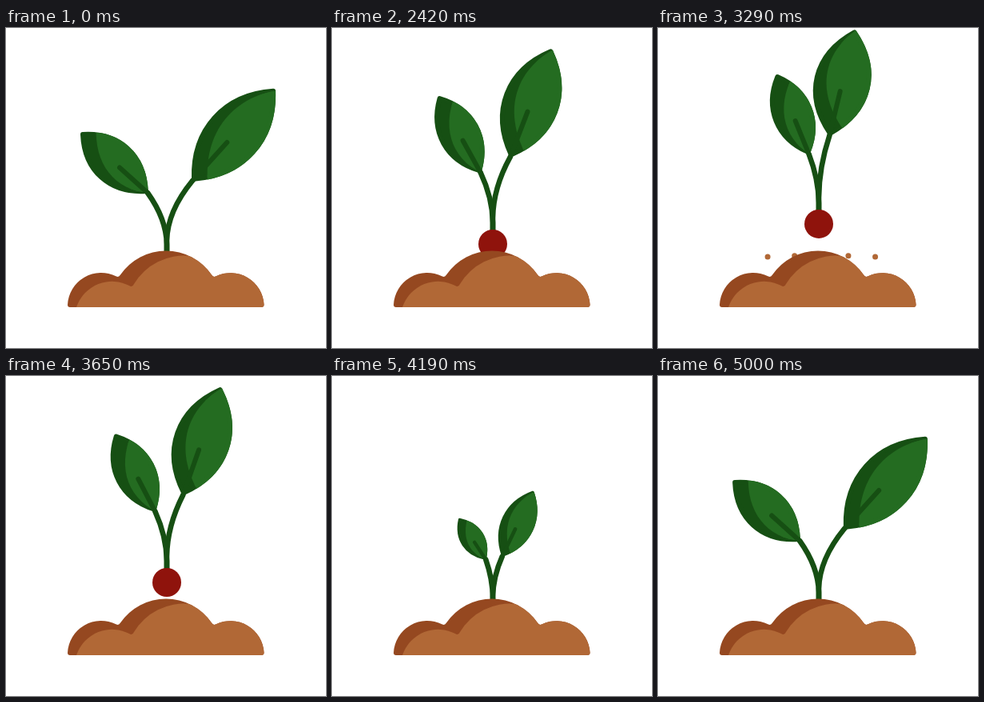
Write an HTML page with a canvas that moves like this. It is 400x400 px and loops after 5.03 s.

```html
<!DOCTYPE html>
<html lang="en">
<head>
<meta charset="utf-8">
<title>Sprout</title>
<style>
html, body { margin: 0; width: 100%; height: 100%; overflow: hidden; background: #fff; }
canvas { display: block; width: 400px; height: 400px; }
</style>
</head>
<body>
<canvas id="stage" width="400" height="400"></canvas>
<script>
const ctx = document.getElementById('stage').getContext('2d');
const LOOP = 5030;
const DARK = '#164f13', LIGHT = '#246c21', BULB = '#8f130c', SOIL = '#b16836', SHADE = '#954820';

const mound = new Path2D('M80 349Q77 349 77 346A42 42 0 0 1 138 310.5Q141 312 143 308.5A69 69 0 0 1 257 308.5Q259 312 262 310.5A42 42 0 0 1 322.5 346Q322.5 349 319 349Z');
const moundLight = new Path2D('M88 349A47 47 0 0 1 155 322.5Q158 324.5 160 320A73 73 0 0 1 230 285L330 270V349Z');

const clamp = v => Math.max(0, Math.min(1, v));
const span = (t, from, to) => clamp((t - from) / (to - from));
const easeOut = u => Math.sin(u * Math.PI / 2);
const easeInOut = u => (1 - Math.cos(u * Math.PI)) / 2;

function disc(x, y, r, color) {
  ctx.fillStyle = color;
  ctx.beginPath();
  ctx.arc(x, y, r, 0, 7);
  ctx.fill();
}

// Fill with softly rounded corners
function paint(path, color) {
  ctx.fillStyle = ctx.strokeStyle = color;
  ctx.lineWidth = 6;
  ctx.fill(path);
  ctx.stroke(path);
}

// Lens outline pointing up from (x, base), w is the handle offset
function lens(len, w, x = 0, base = 0) {
  const p = new Path2D(), y = f => base - len * f;
  p.moveTo(x, y(0));
  p.bezierCurveTo(x - w, y(.3), x - w, y(.7), x, y(1));
  p.bezierCurveTo(x + w, y(.7), x + w, y(.3), x, y(0));
  p.closePath();
  return p;
}

function branch({ x, y, angle, len, width, size, shift }) {
  ctx.strokeStyle = DARK;
  ctx.lineWidth = 6.6;
  ctx.beginPath();
  ctx.moveTo(x, y);
  ctx.bezierCurveTo(x * .45, y * .8, x * .02, y * .57, 0, y * .3);
  ctx.lineTo(0, 0);
  ctx.stroke();
  if (size < .05) return;

  ctx.save();
  ctx.translate(x, y);
  ctx.rotate(angle * Math.PI / 180);
  ctx.scale(size, size);
  const leaf = lens(len - 6, width, 0, -3);
  paint(leaf, DARK);
  ctx.save();
  ctx.clip(lens(len, width + 4, ...shift));
  paint(leaf, LIGHT);
  ctx.restore();
  ctx.strokeStyle = DARK;
  ctx.lineWidth = 6 / Math.sqrt(size);
  ctx.beginPath();
  ctx.moveTo(0, 0);
  ctx.lineTo(0, -len * .42);
  ctx.stroke();
  ctx.restore();
}

// fold: 0 open, 1 closed; young: 1 seedling, 0 fully grown
function plant({ x = 201, y = 298, turn = 0, fold = 0, young = 0 }) {
  const f2 = fold * fold, spread = 1 - 1.1 * young ** .62, late = young ** 1.1;
  ctx.save();
  ctx.translate(x, y);
  ctx.rotate(turn * Math.PI / 180);
  branch({
    x: 32 * spread - 23 * f2, y: -107 + 92 * late - 4 * f2,
    angle: 42 - 40 * young - 31.5 * fold,
    len: 154 - 22 * f2, width: 43, size: 1 - young, shift: [14, -12.7]
  });
  branch({
    x: -24 * spread + 13 * fold, y: -92 + 57 * young + 6 * f2,
    angle: -48 + 36 * young + 28.6 * fold,
    len: 112 - 5 * fold, width: 32.5 - 3 * fold, size: Math.max(0, 1 - 1.2 * late), shift: [12.7, 14]
  });
  disc(0, 0, 18, BULB);
  ctx.restore();
}

function pulledPlant(t) {
  const rise = 55 * easeOut(span(t, 2030, 3180)) - 15 * easeInOut(span(t, 3180, 3650));
  const fold = easeOut(span(t, 2005, 2900)) - .28 * easeInOut(span(t, 3050, 3650));
  const v = Math.max(0, (t - 3650) / 240), fly = v * v;
  plant({ x: 201 + 16 * fly, y: 298 - rise - 134 * fly, turn: 25 * fly, fold: fold * clamp(1 - .7 * v) });
}

function crumbs(t) {
  const u = (t - 2500) / 400;
  if (u < 0 || u > 2.4) return;
  for (const [dx, h] of [[17, 119], [34, 92]])
    for (const side of [-1, 1])
      disc(204.3 + side * dx * u, 290 - h * u * (2 - u), 3.5, SOIL);
}

function draw(t) {
  ctx.fillStyle = '#fff';
  ctx.fillRect(0, 0, 400, 400);
  ctx.lineCap = ctx.lineJoin = 'round';

  if (t > 3800) {
    plant({
      y: 298 + 25 * (1 - span(t, 3800, 3890)),
      young: (1 - span(t, 3800, LOOP)) ** 2.32
    });
  }
  if (t < 4160) pulledPlant(t);
  crumbs(t);

  ctx.fillStyle = SHADE;
  ctx.fill(mound);
  ctx.save();
  ctx.clip(mound);
  ctx.fillStyle = SOIL;
  ctx.fill(moundLight);
  ctx.restore();
}

function frame() {
  draw(performance.now() % LOOP);
  requestAnimationFrame(frame);
}
frame();
</script>
</body>
</html>
```
